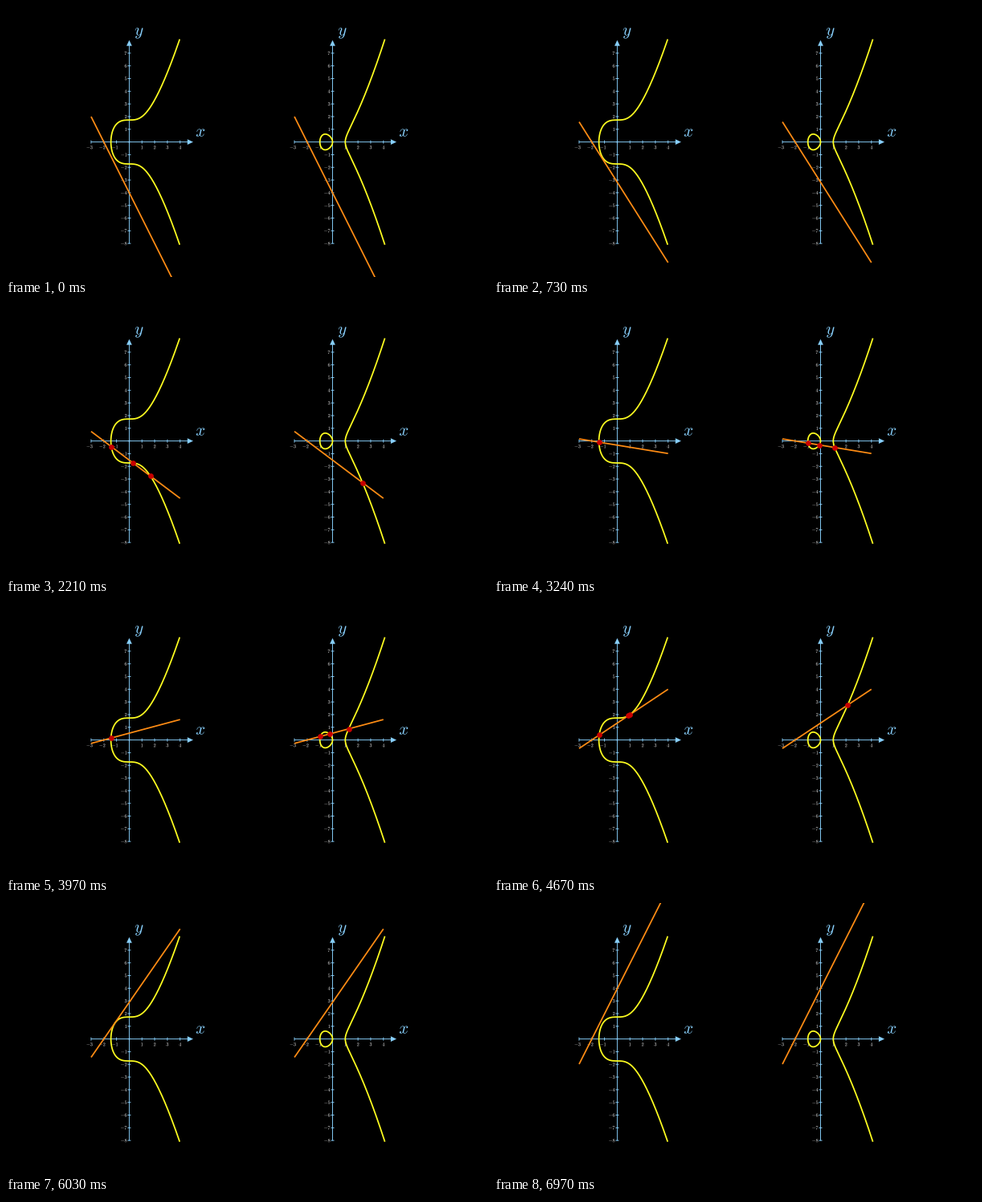
These frames come from a looping animation (600x338 px, 7 s). A matplotlib script:

```python
import numpy as np
import matplotlib.pyplot as plt
from matplotlib.animation import FuncAnimation
from matplotlib.patches import PathPatch
from matplotlib.path import Path
from matplotlib.textpath import TextPath
from matplotlib.transforms import Affine2D

W, H, DPI = 600, 338, 100
LOOP, FRAMES = 7000, 231
UNIT = 15.82
PX = 72 / DPI  # one pixel in points
BLUE, YELLOW, ORANGE, RED = "#87CEFA", "#FFFF20", "#FF8C14", "#C80000"
PIVOT, X_MIN, X_MAX, Y_TOP = -2, -3, 4, 8.1

fig = plt.figure(figsize=(W / DPI, H / DPI), dpi=DPI, facecolor="black")
ax = fig.add_axes([0, 0, 1, 1])
ax.set(xlim=(0, W), ylim=(0, H))
ax.axis("off")


def glyphs(tex, size, x, y, h=0.5):
    """Outline of tex; (x, y) is its ink centre, h moves the horizontal anchor."""
    path = TextPath((0, 0), f"${tex}$", size=size, prop={"math_fontfamily": "cm"})
    box = path.get_extents()
    dx = x - box.x0 - h * box.width
    dy = y - (box.y0 + box.y1) / 2
    return path.transformed(Affine2D().translate(dx, dy))


def fill(paths, color):
    shape = Path.make_compound_path(*paths)
    ax.add_patch(PathPatch(shape, fc=color, lw=0, snap=False, zorder=2))


def real_roots(coeffs):
    r = np.roots(coeffs)
    return r[np.abs(r.imag) < 1e-6].real


class Panel:
    """Axes with the curve y^2 = x^3 + a x + b and a line turning about a point."""

    def __init__(self, ox, oy, a, b):
        self.ox, self.oy, self.a, self.b = ox, oy, a, b
        self.draw_axes()
        self.draw_curve()
        self.line = self.stroke([], [], ORANGE, 1.75, 4)
        self.dots, = ax.plot([], [], "o", color=RED, ms=6.8 * PX, mew=0, zorder=5)

    def px(self, x, y):
        return self.ox + UNIT * np.asarray(x), self.oy + UNIT * np.asarray(y)

    def stroke(self, x, y, color, width, z):
        return ax.plot(*self.px(x, y), color=color, lw=width * PX, zorder=z,
                       solid_capstyle="butt", snap=False)[0]

    def draw_axes(self):
        ox, oy, t = self.ox, self.oy, 2 / UNIT
        xs, ys = range(-3, 5), range(-8, 8)
        self.stroke([-3, 4.7], [0, 0], BLUE, 0.95, 1)
        self.stroke([0, 0], [-8, 7.7], BLUE, 0.95, 1)
        for k in xs:
            self.stroke([k, k], [-t, t], BLUE, 0.95, 1)
        for k in ys:
            self.stroke([-t, t], [k, k], BLUE, 0.95, 1)

        tip = np.array([[0, 0], [-7.2, 3.4], [-7.2, -3.4], [0, 0]])
        fill([Path(tip + [ox + 5 * UNIT + 0.5, oy]),
              Path(tip[:, ::-1] + [ox, oy + 8 * UNIT + 0.5])], BLUE)

        size = 6.2
        nums = [glyphs(k, size, ox + k * UNIT - (1.9 if k < 0 else 0), oy - 6.6)
                for k in xs if k]
        nums += [glyphs(k, size, ox - 3.1, oy + k * UNIT, 1) for k in ys if k]
        fill(nums, "#F0F0F0")
        fill([glyphs("x", 21, ox + 88.6, oy + 11.5),
              glyphs("y", 21, ox + 12.2, oy + 135.7)], BLUE)

    def draw_curve(self):
        cubic = [1, 0, self.a, self.b]
        zeros = np.sort(real_roots(cubic))
        end = max(real_roots([1, 0, self.a, self.b - Y_TOP ** 2]))
        s = np.linspace(-1, 1, 801)
        self.arc(zeros[-1] + (end - zeros[-1]) * s ** 2, s)
        if len(zeros) == 3:
            q = np.linspace(0, 2 * np.pi, 201)
            lo, hi = zeros[:2]
            self.arc(lo + (hi - lo) * (1 - np.cos(q)) / 2, np.sin(q))

    def arc(self, x, side):
        y = np.sqrt(np.maximum(x ** 3 + self.a * x + self.b, 0))
        self.stroke(x, np.sign(side) * y, YELLOW, 1.75, 3)

    def turn(self, m):
        ends = np.array([X_MIN, X_MAX])
        self.line.set_data(*self.px(ends, m * (ends - PIVOT)))
        k = m * m
        x = real_roots([1, -k, self.a + 2 * k * PIVOT, self.b - k * PIVOT ** 2])
        x = x[x <= X_MAX]
        self.dots.set_data(*self.px(x, m * (x - PIVOT)))
        return self.line, self.dots


panels = [Panel(153.4, H - 169.6, 0, 3), Panel(406.5, H - 169.6, -1, 0)]


def update(i):
    m = -2 + 4 * i / FRAMES
    return [art for p in panels for art in p.turn(m)]


anim = FuncAnimation(fig, update, frames=FRAMES, interval=LOOP / FRAMES,
                     init_func=lambda: update(0), repeat=True, repeat_delay=0)
plt.show()
```
